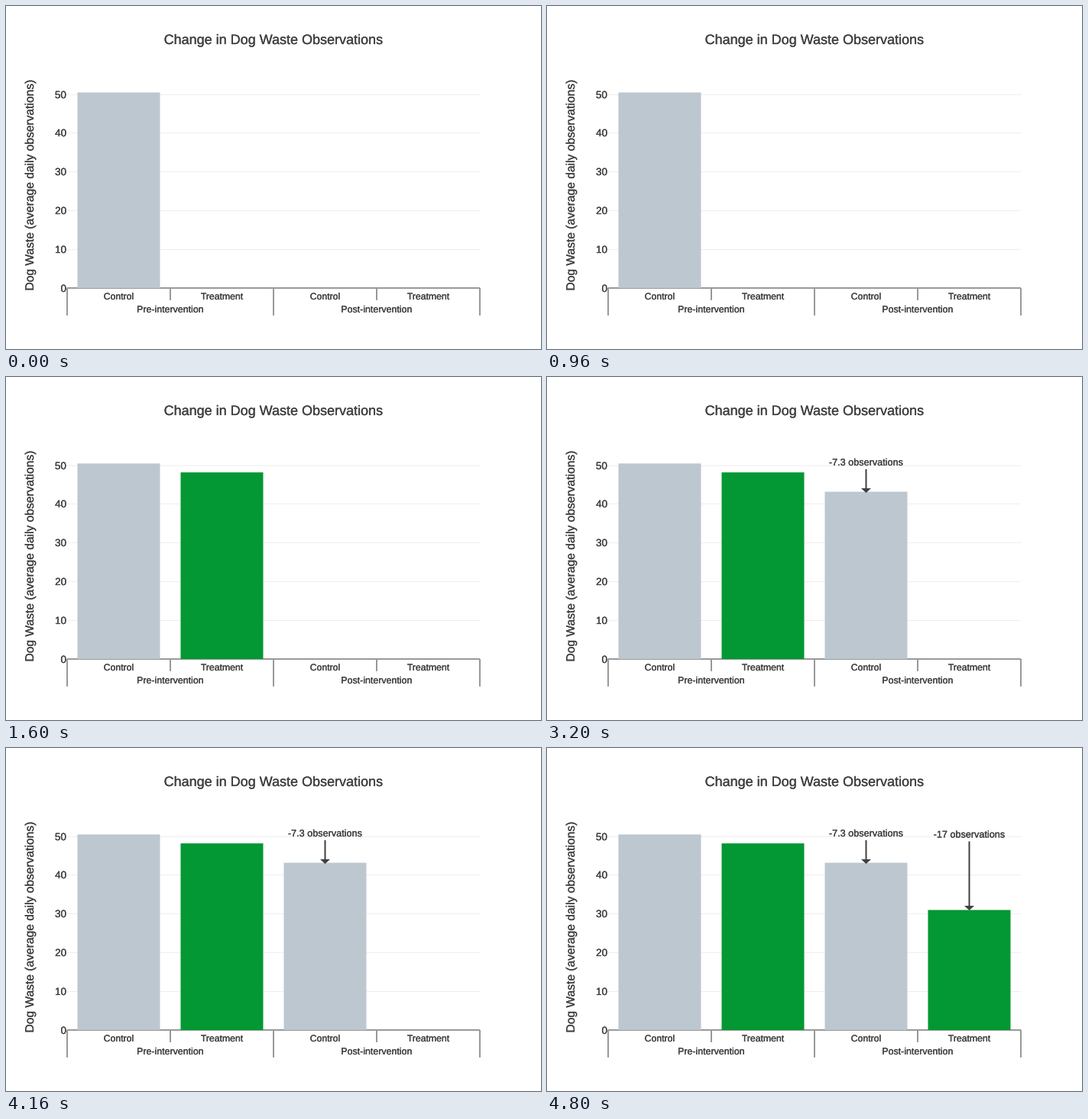
Animation, 700 px wide and 450 px high, one loop 6400 ms. Source, as a matplotlib script:

```python
import matplotlib.pyplot as plt
from matplotlib import patheffects
from matplotlib.animation import FuncAnimation
from matplotlib.patches import Polygon, Rectangle

W, H, DPI = 700, 450, 100
PX = 72 / DPI  # points per pixel
LEFT, RIGHT, BASE = 80, 620, 370
UNIT = 5.08  # pixels per observation
SLOT, BAR_WIDTH = 135, 108
INK, AXIS, GRID = "#404040", "#999999", "#eeeeee"
GRAY, GREEN = "#bdc7d0", "#039833"

plt.rcParams["font.family"] = "Liberation Sans"
fig = plt.figure(figsize=(W / DPI, H / DPI), dpi=DPI, facecolor="white")
ax = fig.add_axes([0, 0, 1, 1])
ax.set(xlim=(0, W), ylim=(H, 0))
ax.axis("off")


def label(x, y, text, size, ha="center", rotation=0):
    weight = patheffects.withStroke(linewidth=0.25 * PX, foreground=INK)
    return ax.text(x, y, text, fontsize=size * PX, color=INK, ha=ha,
                   va="baseline", rotation=rotation, rotation_mode="anchor",
                   path_effects=[weight], zorder=6)


def line(x0, y0, x1, y1, color, width, z):
    return ax.plot([x0, x1], [y0, y1], color=color, lw=width * PX,
                   solid_capstyle="butt", snap=False, zorder=z)[0]


def bar(slot, value, color):
    x = LEFT + (slot + 0.5) * SLOT - BAR_WIDTH / 2
    return ax.add_patch(Rectangle((x, BASE), BAR_WIDTH, -value * UNIT,
                                  facecolor=color, lw=0, snap=False, zorder=4))


def callout(x, baseline, tip, text):
    head = Polygon([(x - 6.5, tip - 6), (x + 6.5, tip - 6), (x, tip)],
                   facecolor=INK, lw=0, zorder=5)
    return [label(x, baseline, text, 12.65),
            line(x, baseline + 5, x, tip - 4, INK, 2, 5),
            ax.add_patch(head)]


label(350, 50, "Change in Dog Waste Observations", 18)
label(36, 235, "Dog Waste (average daily observations)", 15.6, rotation=90)

for value in range(0, 60, 10):
    y = int(BASE - UNIT * value)
    label(79, y + 5, str(value), 13.5, ha="right")
    if value:
        line(LEFT, y + 0.5, RIGHT, y + 0.5, GRID, 1, 1)

line(LEFT, BASE, RIGHT, BASE, AXIS, 2, 3)
for i in range(5):
    x = LEFT + i * SLOT
    line(x, BASE, x, 386 if i % 2 else 406, AXIS, 2, 3)
for i in range(4):
    label(LEFT + (i + 0.5) * SLOT, 385, ("Control", "Treatment")[i % 2], 12.25)
label(215, 402, "Pre-intervention", 12.4)
label(485, 402, "Post-intervention", 12.4)

steps = [
    [bar(0, 50.5, GRAY)],
    [bar(1, 48.2, GREEN)],
    [bar(2, 43.2, GRAY), *callout(417.5, 116, 152, "-7.3 observations")],
    [bar(3, 31, GREEN), *callout(552.5, 117.5, 213, "-17 observations")],
]


def update(frame):
    for i, artists in enumerate(steps):
        for artist in artists:
            artist.set_visible(i <= frame)
    return [artist for artists in steps for artist in artists]


anim = FuncAnimation(fig, update, frames=len(steps), interval=1600,
                     repeat=True, repeat_delay=0, blit=False)
plt.show()
```
